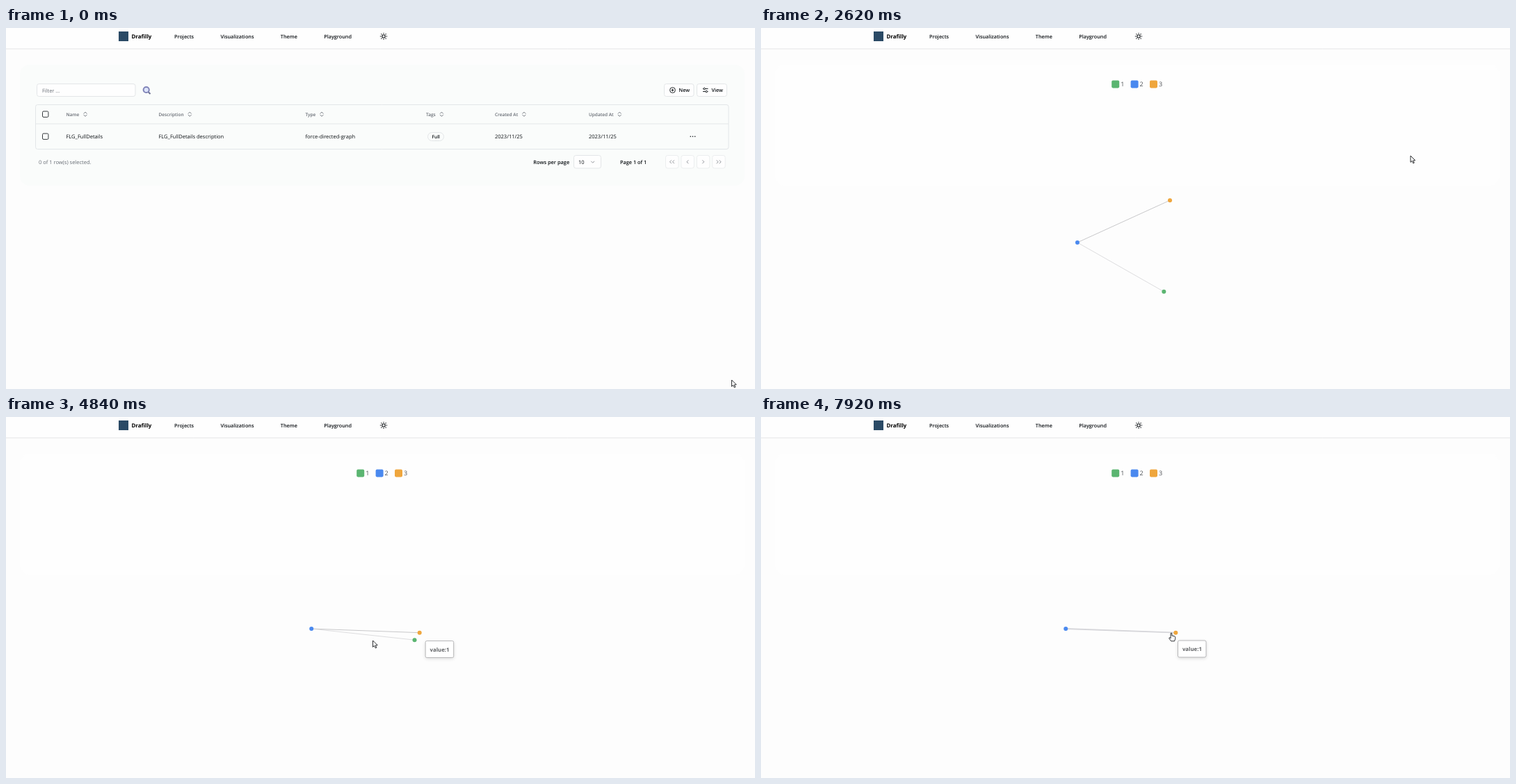
An HTML page with a canvas for the animation above (7990 ms loop, 1077 by 520 pixels).

```html
<!DOCTYPE html>
<html lang="en">
<head>
<meta charset="utf-8">
<title>Visualizations</title>
<style>
html, body { margin: 0; width: 100%; height: 100%; overflow: hidden; background: #fdfdfd; }
canvas { display: block; }
</style>
</head>
<body>
<canvas id="stage" width="1077" height="520"></canvas>
<script>
const ctx = document.getElementById('stage').getContext('2d');
const LOOP = 7990, GRAPH_AT = 2420;
const INK = '#0c1014', MUTED = '#676c74', EDGE = '#e3e6e8', PAPER = '#fefefe';

const clamp = v => Math.max(0, Math.min(1, v));
const progress = (t, a, b) => clamp((t - a) / (b - a));
const smooth = p => p * p * (3 - 2 * p);
const mix = (a, b, p) => a + (b - a) * p;

const START = { x: 1043.5, y: 507 };
const MOVES = [
  { from: 70, to: 770, x: 984.5, y: 158 },
  { from: 1140, to: 1440, x: 934, y: 184 },
  { from: 2640, to: 3970, x: 594, y: 311.5 },
  { from: 4600, to: 4840, x: 527.5, y: 322 },
  { from: 4840, to: 5200, x: 439, y: 305 },
  { from: 5700, to: 6510, x: 1036, y: 508 },
  { from: 6580, to: 6930, x: 900, y: 446 },
  { from: 7250, to: 7800, x: 590, y: 311 }
];
const HOVERS = [
  { node: 'orange', from: 4090, to: 4610 },
  { node: 'blue', from: 5170, to: 5830 },
  { node: 'orange', from: 7760, to: LOOP }
];

// Nodes fall from their start to home, then creep sideways by a fading drift.
const NODES = {
  green: { color: '#5bb571', start: [579.3, 380], home: [587, 321.2], drift: 1.3 },
  blue: { color: '#4a89ef', start: [455, 309], home: [438, 305], drift: 3 },
  orange: { color: '#efa63d', start: [588, 248], home: [596.7, 310.7], drift: -5 }
};

function pointerAt(t) {
  return MOVES.reduce((pos, move) => {
    const p = smooth(progress(t, move.from, move.to));
    return { x: mix(pos.x, move.x, p), y: mix(pos.y, move.y, p) };
  }, START);
}

function nodeAt({ start, home, drift }, t) {
  const p = smooth(progress(t, 2600, 3200));
  const creep = drift * Math.exp(-Math.max(0, t - 3200) / 1800);
  return [mix(start[0], home[0] + creep, p), mix(start[1], home[1], p)];
}

// Draws text centred on y and returns the x where it ends.
function text(str, x, y, size = 7.5, weight = 400, color = INK) {
  ctx.font = `${weight} ${size}px "Open Sans", "Noto Sans", sans-serif`;
  ctx.textRendering = 'geometricPrecision';
  ctx.fillStyle = color;
  ctx.fillText(str, x, y + size * 0.36);
  return x + ctx.measureText(str).width;
}

function paint(fill, stroke, width = 1) {
  if (fill) { ctx.fillStyle = fill; ctx.fill(); }
  if (stroke) { ctx.strokeStyle = stroke; ctx.lineWidth = width; ctx.stroke(); }
}

function box(x, y, w, h, r, fill, stroke) {
  ctx.beginPath();
  ctx.roundRect(x, y, w, h, r);
  paint(fill, stroke);
}

function shadowBox(x, y, w, h, r, stroke) {
  ctx.save();
  ctx.shadowColor = 'rgba(0,0,0,.16)';
  ctx.shadowBlur = 5;
  ctx.shadowOffsetY = 1.5;
  box(x, y, w, h, r, '#fff');
  ctx.restore();
  box(x, y, w, h, r, null, stroke);
}

function line(points, color, width = 1) {
  ctx.beginPath();
  points.forEach(([x, y]) => ctx.lineTo(x, y));
  paint(null, color, width);
}

function dot(x, y, r, fill, stroke, width) {
  ctx.beginPath();
  ctx.arc(x, y, r, 0, Math.PI * 2);
  paint(fill, stroke, width);
}

function chevron(x, y, angle, color = '#858a90') {
  ctx.save();
  ctx.translate(x, y);
  ctx.rotate(angle);
  line([[-1.2, -2.4], [1.2, 0], [-1.2, 2.4]], color, 0.9);
  ctx.restore();
}
const RIGHT = 0, DOWN = Math.PI / 2, LEFT = Math.PI, UP = -DOWN;

function sun(x, y) {
  dot(x, y, 2.2, null, INK, 1.1);
  for (let a = 0; a < 2 * Math.PI; a += Math.PI / 4) {
    const c = Math.cos(a), s = Math.sin(a);
    line([[x + c * 3.7, y + s * 3.7], [x + c * 5.1, y + s * 5.1]], INK, 1.1);
  }
}

function header() {
  ctx.fillStyle = PAPER;
  ctx.fillRect(0, 0, 1077, 30);
  line([[0, 30], [1077, 30]], '#e4e5e6');
  ctx.fillStyle = '#2b4a66';
  ctx.fillRect(162, 5, 14, 14);
  text('Drafilly', 180.5, 12, 7.9, 700, '#000');
  let x = 242;
  for (const label of ['Projects', 'Visualizations', 'Theme', 'Playground']) {
    x = text(label, x, 12, 7.25, 600) + 38.4;
  }
  sun(543, 12);
}

function button(label, x, w) {
  box(x, 80.5, w, 18, 3, PAPER, EDGE);
  text(label, x + 21, 89.8, 7.2, 600);
}

function toolbar() {
  box(44.5, 80.5, 141.5, 18, 3, PAPER, EDGE);
  text('Filter ...', 52, 90, 7.4, 400, MUTED);
  line([[204.5, 92], [207.5, 95]], '#69708f', 2);
  dot(201.7, 89, 4.1, '#dde4fa', '#8084b8', 2);

  button('New', 946.5, 42.5);
  dot(958.5, 89.5, 3.9, null, INK, 0.9);
  line([[956.5, 89.5], [960.5, 89.5]], INK, 0.9);
  line([[958.5, 87.5], [958.5, 91.5]], INK, 0.9);

  button('View', 993.5, 43);
  for (const side of [-1, 1]) {
    const y = 89.5 + side * 2;
    line([[1002, y], [1009.5, y]], INK, 0.9);
    dot(1005.7 + side * 1.5, y, 1.3, '#fff', INK, 0.9);
  }
}

function table(hover) {
  const columns = [
    ['Name', 86.5, 'FLG_FullDetails'], ['Description', 219.5, 'FLG_FullDetails description'],
    ['Type', 430.5, 'force-directed-graph'], ['Tags', 604, ''],
    ['Created At', 703, '2023/11/25'], ['Updated At', 838, '2023/11/25']
  ];
  box(43, 110.5, 996, 64, 3, '#fafcfb');
  ctx.globalAlpha = hover;
  box(43, 138, 996, 36.5, [0, 0, 3, 3], '#f6f6f6');
  ctx.globalAlpha = 1;
  box(42.5, 110.5, 996.5, 64, 3, null, EDGE);
  line([[43, 138], [1039, 138]], EDGE);
  for (const y of [120, 152]) box(52.5, y, 8.4, 8.4, 1.5, null, '#34383c');

  for (const [label, x, cell] of columns) {
    const icon = text(label, x, 124.3, 6.5, 600, MUTED) + 8.7;
    chevron(icon, 122.3, UP, MUTED);
    chevron(icon, 126.1, DOWN, MUTED);
    text(cell, x, 156.2);
  }
  box(606.5, 150.5, 23, 12, 6, null, EDGE);
  text('Full', 612.5, 156.4, 6.6, 600);
  for (const dx of [-3.2, 0, 3.2]) dot(987.5 + dx, 156.2, 0.8, INK);
}

function pagination() {
  text('0 of 1 row(s) selected.', 47, 193.2, 7.5, 400, MUTED);
  text('Rows per page', 758.3, 193.2, 7.4, 600);
  box(816.5, 183.5, 39, 18.5, 3, PAPER, EDGE);
  text('10', 823, 193.2);
  chevron(843.7, 193, DOWN);
  text('Page 1 of 1', 883, 193.2, 7.3, 600);
  for (let i = 0; i < 4; i++) {
    const x = 948.5 + i * 22.4;
    box(x, 183.5, 18.5, 18.5, 3, PAPER, '#eceeef');
    const gaps = i % 3 ? [0] : [-2, 2];
    gaps.forEach(gap => chevron(x + 9.2 + gap, 192.8, i < 2 ? LEFT : RIGHT));
  }
}

function menu(t) {
  ctx.globalAlpha = 1 - progress(t, 1540, 1630);
  shadowBox(906.5, 164.5, 89.5, 46, 3, '#e6e7e8');
  if (t > 1240) box(909, 167, 84.5, 17.5, 2, '#f4f4f5');
  text('View', 913.3, 175.6, 7.5, 400, '#25292d');
  line([[907, 187], [996, 187]], '#eeeff0');
  text('Delete', 913.3, 198.8, 7.5, 400, '#25292d');
  ctx.font = '6px "DejaVu Sans", sans-serif';
  ctx.fillStyle = '#85898e';
  ctx.fillText('⌘⌫', 974, 201);
  ctx.globalAlpha = 1;
}

function listPage(t) {
  box(20, 53, 1042, 174, 14, '#fafcfb');
  toolbar();
  table(progress(t, 640, 740) - progress(t, 1170, 1320));
  pagination();
  if (t >= 1090 && t < 1630) menu(t);
}

const hoverAt = t => HOVERS.find(h => t >= h.from && t < h.to);

function graphPage(t) {
  box(20, 53, 1042, 174, 14, PAPER);
  Object.values(NODES).forEach(({ color }, i) => {
    const x = 504.2 + i * 27.4;
    box(x, 75.6, 11, 10.8, 1.8, color);
    text(String(i + 1), x + 13, 81.2, 9, 400, '#4d5054');
  });

  const focus = hoverAt(t);
  const hidden = focus?.node === 'orange' ? 'green' : null;
  const hub = nodeAt(NODES.blue, t);
  for (const [name, shade] of [['green', '#dddddf'], ['orange', '#c8c8ca']]) {
    if (name === hidden) continue;
    line([hub, nodeAt(NODES[name], t)], focus ? '#d6d6da' : shade, focus ? 1.8 : 1);
  }
  for (const [name, node] of Object.entries(NODES)) {
    if (name !== hidden) dot(...nodeAt(node, t), 3, node.color);
  }
}

// Follows the pointer while hovering, then lingers and fades.
function tooltip(t) {
  for (const { from, to } of HOVERS) {
    if (t < from + 40 || t > to + 380) continue;
    const { x, y } = pointerAt(Math.min(t, to));
    ctx.globalAlpha = 1 - progress(t, to + 250, to + 380);
    shadowBox(x + 9.5, y + 11, 40.5, 24, 2, '#b8b8ba');
    text('value:1', x + 15.9, y + 23.3, 7.8, 700, '#606265');
    ctx.globalAlpha = 1;
  }
}

const ARROW = new Path2D('M0 0V9.4L2.2 7.4 3.8 10.9 5.3 10.2 3.8 6.9 6.7 6.7Z');
const HAND = new Path2D('M-.9 .6Q0-.5 .9 .6V4L4.3 4.7Q5.7 5 5.7 6.4V8.4L4.6 11.8H-.3L-3 8.2Q-3.6 6.8-2.3 6.7L-.9 7.8Z');

function pointer(t) {
  const { x, y } = pointerAt(t);
  const clicking = [1090, 1450].some(start => t >= start && t < start + 150);
  if (clicking) dot(x, y + 0.5, 6.3, 'rgba(250,238,60,.75)');
  const path = hoverAt(t) ? HAND : ARROW;
  ctx.save();
  ctx.translate(x, y);
  ctx.lineJoin = 'round';
  ctx.lineWidth = 0.9;
  ctx.fillStyle = '#fff';
  ctx.strokeStyle = '#15171a';
  ctx.fill(path);
  ctx.stroke(path);
  ctx.restore();
}

function draw() {
  const t = performance.now() % LOOP;
  ctx.fillStyle = '#fdfdfd';
  ctx.fillRect(0, 0, 1077, 520);
  header();
  if (t < GRAPH_AT) {
    listPage(t);
  } else {
    graphPage(t);
    tooltip(t);
  }
  pointer(t);
  requestAnimationFrame(draw);
}
draw();
</script>
</body>
</html>
```
